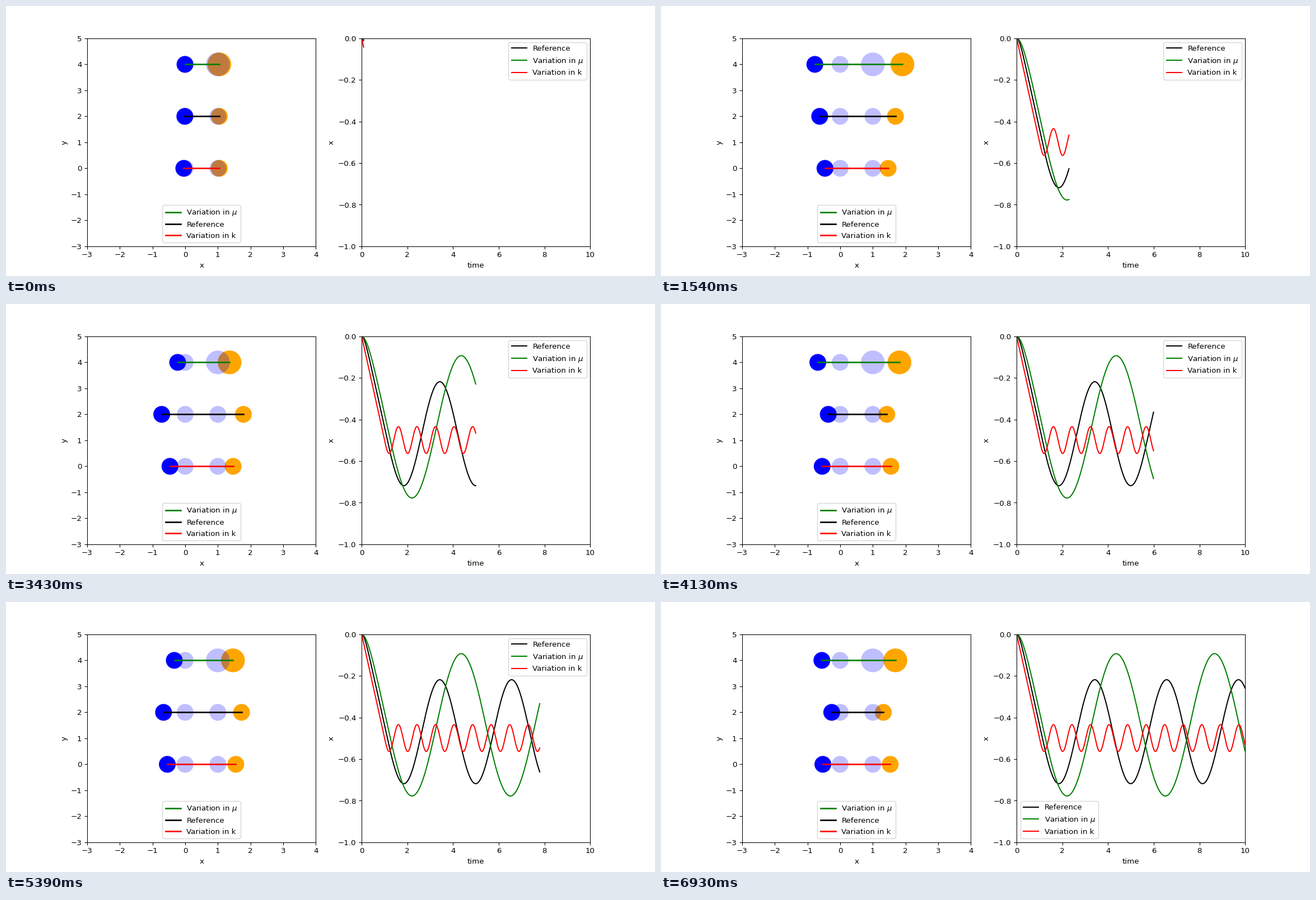
Animation of 1159 by 483 pixels, one loop 7 s. Source, as a matplotlib script:

```python
import numpy as np
import matplotlib.pyplot as plt
from matplotlib.animation import FuncAnimation

plt.rcParams["font.family"] = "DejaVu Sans"

FRAMES, INTERVAL = 100, 70
STEP = 10                       # samples added per frame
SMALL, BIG = 500, 1000          # mass sizes
MU = r"Variation in $\mu$"
K = "Variation in k"
REF = "Reference"

t = np.arange(0, 10, 0.01)


def motion(k, mu, lag):
    """Both masses drift apart, then oscillate once the spring is at length 2."""
    w = np.sqrt(k / mu)
    start = 1 + lag
    c = np.log(2) / (2 * lag)   # how fast the left mass gets up to speed
    drift = (np.logaddexp(c * t, -c * t) - np.log(2)) / (2 * c)
    swing = np.sin(w * (t - start)) / (2 * w)
    left = np.where(t < start, -drift, -0.5 + lag / 2 - swing)
    right = np.where(t < start, 1 + t / 2, 1.5 + lag / 2 + swing)
    return left, right


# label, colour, height, right mass size, (left, right) paths
systems = [
    (REF, "black", 2, SMALL, motion(2, 1 / 2, 0.064)),
    (MU, "green", 4, BIG, motion(2, 15 / 16, 0.13)),
    (K, "red", 0, SMALL, motion(30, 1 / 2, 0.003)),
]
heights = [s[2] for s in systems]
lefts = np.array([s[4][0] for s in systems])
rights = np.array([s[4][1] for s in systems])
sizes = [SMALL] * 3 + [s[3] for s in systems]

# 1159 x 483 pixels
fig, (ax, plot) = plt.subplots(1, 2, figsize=(12, 5), dpi=96.61)
ax.set(xlim=(-3, 4), ylim=(-3, 5), xlabel="x", ylabel="y")
plot.set(xlim=(0, 10), ylim=(-1, 0), xlabel="time", ylabel="x")


def masses(colors, **kw):
    return ax.scatter([0] * 3 + [1] * 3, heights * 2, s=sizes, c=colors,
                      linewidths=0, **kw)


balls = masses(["blue"] * 3 + ["orange"] * 3)
masses(["blue"] * 6, alpha=0.25)

rods, curves = [], []
for label, color, y, *_ in systems:
    rods += ax.plot([0, 1], [y, y], color=color, lw=2, label=label)
    curves += plot.plot([], [], color=color, lw=1.5, label=label)

ax.legend(handles=[rods[i] for i in (1, 0, 2)], loc="lower center")
plot.legend(loc="best")


def update(frame):
    n = (frame + 1) * STEP
    a, b = lefts[:, n - 1], rights[:, n - 1]
    balls.set_offsets(np.column_stack([np.concatenate([a, b]), heights * 2]))
    for i, (rod, curve) in enumerate(zip(rods, curves)):
        rod.set_xdata([a[i], b[i]])
        curve.set_data(t[:n], lefts[i, :n])
    return []


anim = FuncAnimation(fig, update, frames=FRAMES, interval=INTERVAL,
                     repeat=True, repeat_delay=0, blit=False)
plt.show()
```
